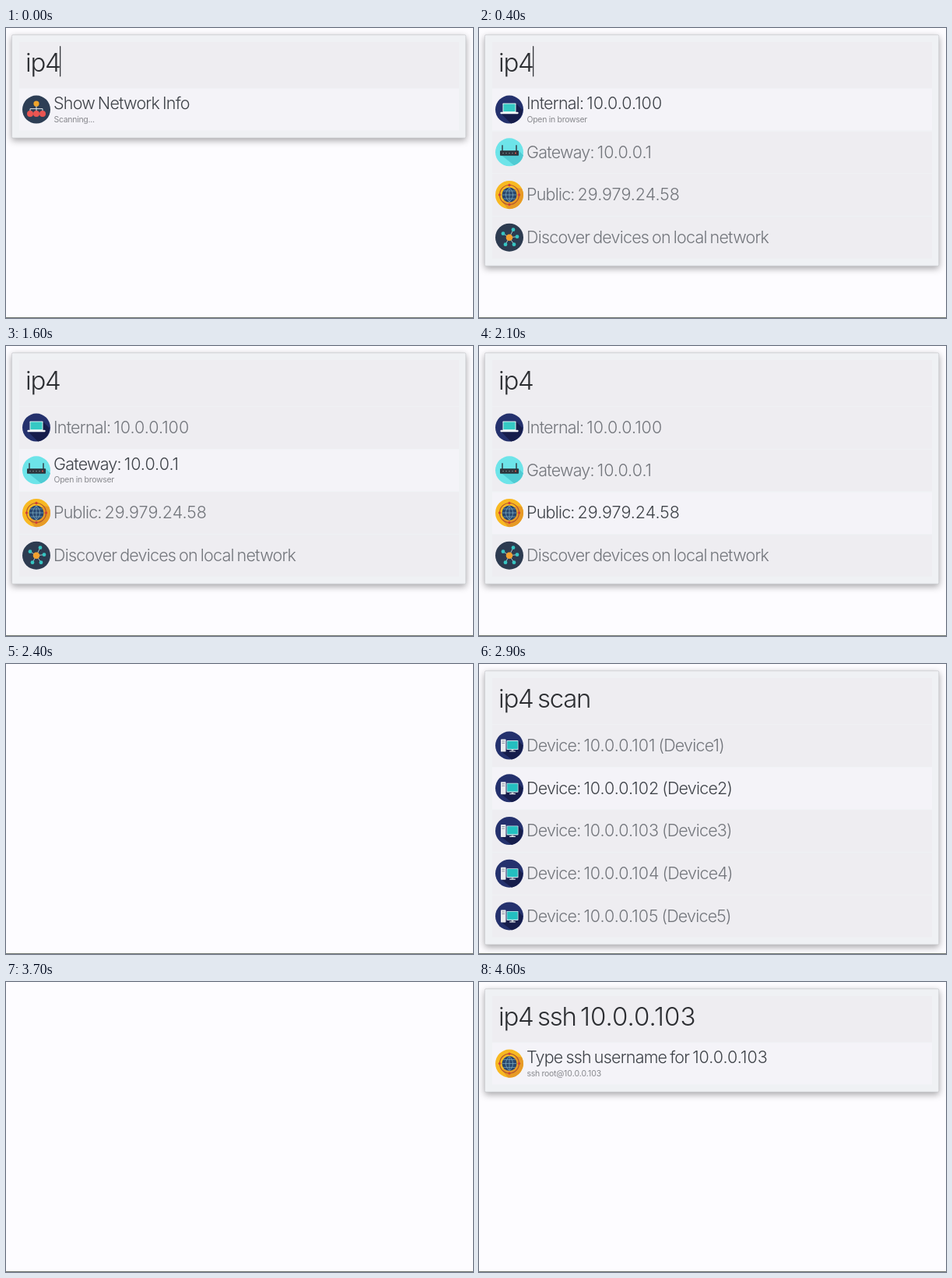
Recreate the animation shown at these times as an HTML page. Size 600 by 372 pixels, loop 4.9 s.

```html
<!DOCTYPE html>
<html lang="en">
<head>
<meta charset="utf-8">
<title>Network info launcher</title>
<style>
  html, body { margin: 0; width: 100%; height: 100%; overflow: hidden; background: #fdfcff; }
  svg { display: block; width: 600px; height: 372px; }
  text { font-family: Inter, Roboto, sans-serif; font-weight: 300; font-optical-sizing: none; white-space: pre; }
  tspan { letter-spacing: 0; }
  .query { font-size: 33px; letter-spacing: -1.25px; word-spacing: -2.7px; fill: #2c2e32; }
  .title { font-size: 21.5px; letter-spacing: -.8px; word-spacing: -1.3px; fill: #73767c; }
  .on .title { fill: #3e4248; }
  .sub { font-size: 10.5px; font-weight: 400; letter-spacing: -.3px; fill: #88898e; }
  .panel { fill: #eff1f4; stroke: #c4c6ca; stroke-width: .7; filter: drop-shadow(0 3px 4px rgba(0,0,0,.34)); }
  .band { fill: #eeedf1; }
  .on .band { fill: #f4f3f8; }
</style>
</head>
<body>
<svg viewBox="0 0 600 372">
  <g id="stage"></g>
  <rect y="371" width="600" height="1" fill="#70766f"/>
</svg>
<script>
const LOOP = 4900, PITCH = 54.7, TOP = 78;

const disc = (fill, r = 18, x = 0, y = 0) => `<circle cx="${x}" cy="${y}" r="${r}" fill="${fill}"/>`;
const box = (x, y, w, h, fill) => `<rect x="${x}" y="${y}" width="${w}" height="${h}" rx=".7" fill="${fill}"/>`;
const line = (d, stroke, width = 1) => `<path d="${d}" fill="none" stroke="${stroke}" stroke-width="${width}"/>`;
const shade = (d, fill) => `<path d="${d}" fill="${fill}"/>`;
// Addresses are set looser than words.
const label = (kind, x, y, words) =>
  `<text class="${kind}" x="${x}" y="${y}">${words.replace(/\d+(\.\d+){3}/, '<tspan>$&</tspan>')}</text>`;

// Icons are drawn around their own centre.
const spokes = [[-8, -5], [5, -10], [10, -1], [6, 9], [-5, 9]];
const icons = {
  tree: disc('#2d3e55') +
    line('M0-5V4M-8 4V-1H8V4', '#e6e9ea') +
    disc('#f0a52c', 3.6, 0, -7.5) +
    [-8, 0, 8].map(x => disc('#ea5552', 4, x, 5.5)).join(''),
  laptop: disc('#24316d') +
    shade('M8-8L17 1A18 18 0 0 1 2 18L-11 5Z', '#161d4b') +
    box(-8.5, -8, 17, 11.5, '#d9f4f1') + box(-7.5, -7, 15, 9.5, '#35c9c4') +
    box(-11.5, 3.2, 23, 2.4, '#f4f4f6'),
  router: disc('#6de4e9') +
    shade('M12-2L18 4A18 18 0 0 1 6 17L-10 4Z', '#4fcbd3') +
    line('M-9-1V-9M9-1V-9', '#34414c', 1.5) +
    box(-12, -2, 24, 6.5, '#2c343c') +
    [-8, -4, 0, 4].map(x => disc('#7a8b91', .8, x, 1.3)).join('') + disc('#e65b4f', 1, 8, 1.3),
  globe: disc('#f8b922') +
    shade('M9-9L16 -8A18 18 0 0 1 -2 18L-9 9Z', '#e79a26') +
    line('M-12.5 0A12.5 12.5 0 1 1 12.5 0A12.5 12.5 0 1 1-12.5 0', '#b0552f', 1.2) +
    disc('#27466f', 9.5) +
    line('M-9 0H9M0-9V9M-7.5-5H7.5M-7.5 5H7.5M0-9C-6-4-6 4 0 9C6 4 6-4 0-9', '#83b3c6', .7) +
    [[-12.5, 0], [12.5, 0], [0, -12.5], [0, 12.5]].map(p => disc('#cf4238', 1.7, ...p)).join(''),
  hub: disc('#2d3b50') +
    spokes.map(p => line('M0 0L' + p, '#a9c5c9') + disc('#36c5c2', 2.4, ...p)).join('') +
    disc('#f2a02f', 4.3),
  desktop: disc('#24316d') +
    shade('M11-7L17 0A18 18 0 0 1 3 18L-10 8Z', '#161d4b') +
    box(-11, -8, 6.5, 16, '#e9ebee') + box(-9.8, -6, 4, 1, '#8b96a4') + box(-9.8, -3.5, 4, 1, '#8b96a4') +
    box(-3.5, -6.5, 15, 12, '#c9e4e8') + box(-2.7, -5.7, 13.4, 10, '#24bfc0') +
    box(2.5, 5.5, 3, 1.5, '#b7c2c9') + box(0, 6.8, 8, 1.2, '#e9ebee')
};

const info = [['tree', 'Show Network Info', 'Scanning...']];
const network = [
  ['laptop', 'Internal: 10.0.0.100', 'Open in browser'],
  ['router', 'Gateway: 10.0.0.1', 'Open in browser'],
  ['globe', 'Public: 29.979.24.58'],
  ['hub', 'Discover devices on local network']
];
const scanning = [['hub', 'Discover devices on local network', 'Scanning...']];
const devices = [1, 2, 3, 4, 5].map(n => ['desktop', `Device: 10.0.0.10${n} (Device${n})`]);
const ssh = [['globe', 'Type ssh username for 10.0.0.103', 'ssh root@10.0.0.103']];

// start time, query, caret x, rows, selected row
const scenes = [
  [0, 'ip4', 69, info, 0],
  [200, 'ip4', 69, network, 0],
  [1300, 'ip4', 69, network, 1],
  [2000, 'ip4', 69, network, 2],
  [2300],
  [2500, 'ip4 scan', 143, scanning, 0],
  [2600, 'ip4 scan', 143, devices, 0],
  [2800, 'ip4 scan', 143, devices, 1],
  [3100, 'ip4 scan', 143, devices, 2],
  [3500],
  [3800, 'ip4 ssh 10.0.0.103 ', 286.3, ssh, 0]
];
const blinks = [0, 300, 800, 1300, 1800, 2500, 3000, 3900, 4400];

function row([icon, title, sub], i, selected) {
  const on = i === selected, note = on && sub;
  return `<g transform="translate(0 ${TOP + i * PITCH})" class="${on ? 'on' : ''}">
    <rect class="band" x="17" width="565" height="53.6"/>
    <g transform="translate(39 26.6)">${icons[icon]}</g>
    ${label('title', 61, note ? 26.3 : 34, title)}
    ${note ? label('sub', 61.5, 42.5, sub) : ''}</g>`;
}

function draw([, query, caretX, rows, selected], caret) {
  if (!rows) return '';
  return `<rect class="panel" x="7.4" y="8.8" width="583.4" height="${77.6 + rows.length * PITCH}" rx="1.5"/>
    <rect class="band" x="17" y="18" width="565" height="59"/>
    ${label('query', 25, 55.5, query)}
    ${caret ? box(caretX, 23, 1.3, 39.5, '#36383c') : ''}
    ${rows.map((r, i) => row(r, i, selected)).join('')}`;
}

const stage = document.getElementById('stage');
let shown;
function tick() {
  const t = performance.now() % LOOP;
  const index = scenes.findLastIndex(s => s[0] <= t);
  const caret = blinks.some(b => t >= b && t < b + 200);
  const state = index + ' ' + caret;
  if (state !== shown) {
    stage.innerHTML = draw(scenes[index], caret);
    shown = state;
  }
  requestAnimationFrame(tick);
}
tick();
</script>
</body>
</html>
```
